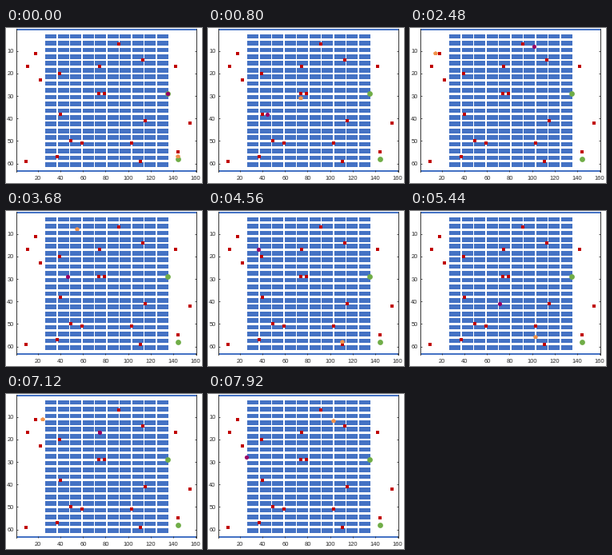
A matplotlib script that plays this animation: 245x194 px, repeating every 8 s.

```python
import numpy as np
import matplotlib.pyplot as plt
from matplotlib.animation import FuncAnimation

W, H, DPI = 245, 194, 100
PX = 72 / DPI
FRAMES, INTERVAL = 100, 80
SPEED = 10  # grid cells per frame
TOP, BOTTOM = 0.15, 63.7

BLUE, RED, GREEN = "#4472C4", "#C00000", "#70AD47"
ORANGE, PURPLE, INK = "#F0914A", "#990066", "#262626"

# Places the robots call at, also shown as items or stations.
NORTH, WEST, EAST = (92, 7), (10.5, 17), (155, 42)
MIDWEST, CORNER, SOUTH = (40, 38), (9, 59), (111, 59)
CENTRE, LOW, UPPER = (74, 29), (59, 51), (18, 11)
DEPOT, DOCK = (135, 29), (144, 58)

ITEMS = [NORTH, WEST, EAST, MIDWEST, CORNER, SOUTH, CENTRE, LOW, UPPER,
         (22, 23), (39, 20), (75, 17), (113, 14), (142, 17), (79, 29),
         (115, 41), (49, 50), (103, 51), (37, 57), (144, 55)]

PICKER = [DEPOT, MIDWEST, EAST, DEPOT, NORTH, WEST, (90, 29), WEST,
          EAST, DEPOT, NORTH, WEST, (26, 28)]
CARRIER = [(144, 57), CENTRE, SOUTH, (81, 47), (9, 11), CORNER, NORTH,
           (103, 8), SOUTH, LOW, (142, 55), (92, 50), NORTH, UPPER,
           (103, 8), (103, 12)]


def aisle(y):
    """Nearest row between two shelves."""
    return 3 * round((y - 2) / 3) + 2


def walk(stops):
    """Per-frame positions: change row, follow the aisle, enter the stop."""
    path = [stops[0]]
    for x, y in stops[1:]:
        row = aisle(y)
        path += [(path[-1][0], row), (x, row), (x, y)]
    path = np.array(path, float)
    steps = np.abs(np.diff(path, axis=0)).sum(axis=1)
    dist = np.concatenate([[0], np.cumsum(steps)])
    s = np.arange(FRAMES) * SPEED
    return np.interp(s, dist, path[:, 0]), np.interp(s, dist, path[:, 1])


fig = plt.figure(figsize=(W / DPI, H / DPI), dpi=DPI, facecolor="white")
ax = fig.add_axes([12.6 / W, 1 - 180 / H, 225.2 / W, 179 / H])
ax.set_xlim(0.5, 160.5)
ax.set_ylim(BOTTOM, TOP)
ax.set_xticks(range(20, 161, 20))
ax.set_yticks(range(10, 61, 10))
ax.tick_params(direction="in", length=2 * PX, width=0.8 * PX, pad=3 * PX,
               right=True, color=INK, labelcolor=INK)
ax.tick_params(axis="x", pad=5 * PX)
for label in ax.get_xticklabels() + ax.get_yticklabels():
    label.set(fontname="Liberation Sans", fontsize=7.5 * PX)
ax.spines[["top", "bottom"]].set_visible(False)
ax.spines[["left", "right"]].set(linewidth=0.9 * PX, color=INK)

# Walls and shelves
ax.axhspan(TOP, TOP + 0.7, color=BLUE, linewidth=0)
ax.axhspan(BOTTOM - 0.7, BOTTOM, color=BLUE, linewidth=0)
shelves = [(26.5 + 11 * k, 10) for k in range(10)]
for row in range(20):
    ax.broken_barh(shelves, (2.5 + 3 * row, 2), color=BLUE, linewidth=0)


def dots(points, marker, color, size, z):
    xs, ys = zip(*points)
    return ax.plot(xs, ys, marker, color=color, markersize=size * PX,
                   markeredgewidth=0, zorder=z)[0]


dots([DEPOT, DOCK], "o", GREEN, 6.8, 3)
dots(ITEMS, "s", RED, 4.4, 5)
carrier = dots(CARRIER[:1], "p", ORANGE, 5.8, 6)
picker = dots(PICKER[:1], "o", PURPLE, 5.2, 6)
movers = [(picker, walk(PICKER)), (carrier, walk(CARRIER))]


def update(i):
    for dot, (xs, ys) in movers:
        dot.set_data([xs[i]], [ys[i]])
    return picker, carrier


anim = FuncAnimation(fig, update, frames=FRAMES, interval=INTERVAL,
                     repeat=True, repeat_delay=0)
plt.show()
```
